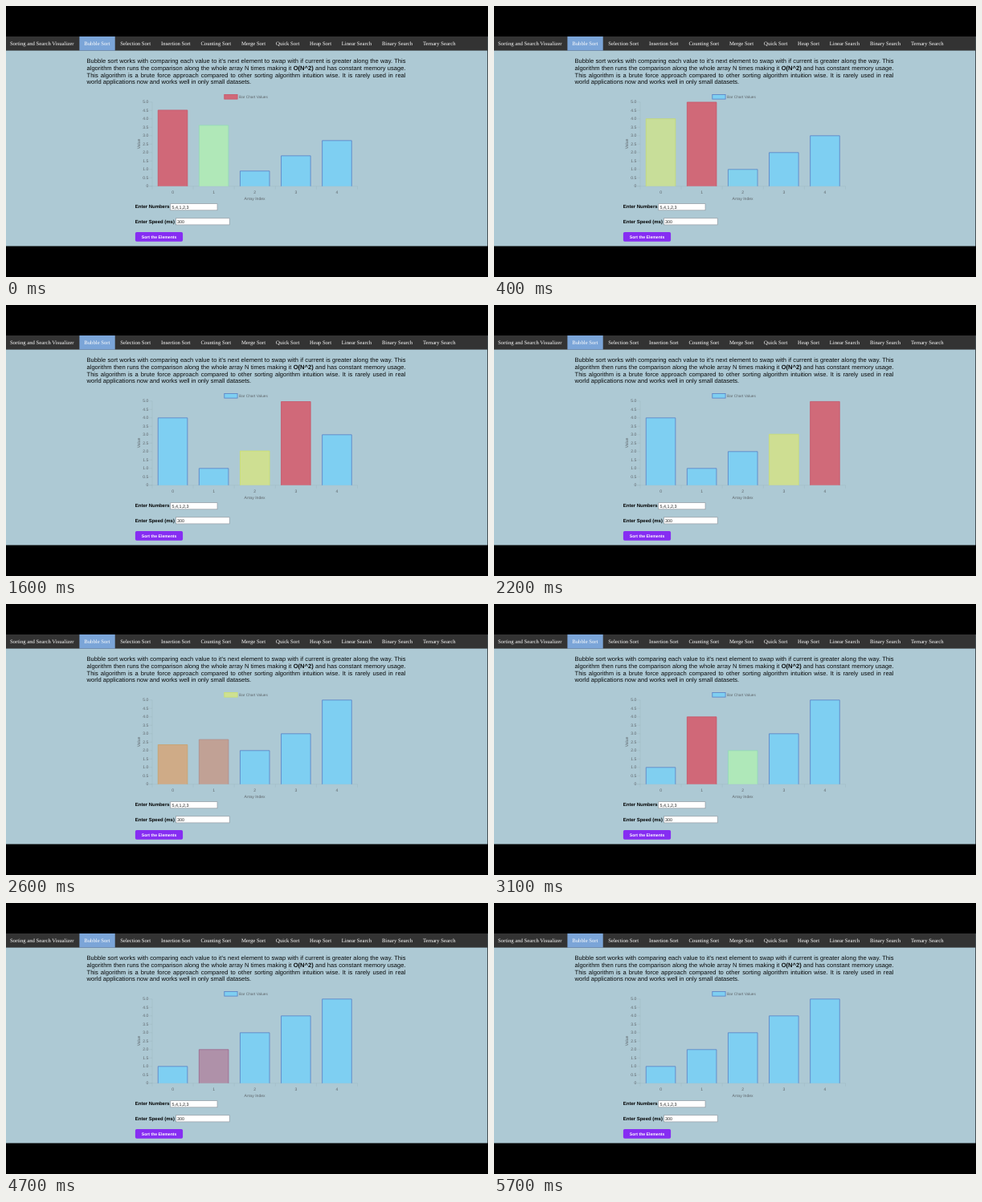
An HTML page that plays this animation: 600 px wide and 338 px high, repeating every 5.9 s.

```html
<!DOCTYPE html>
<html lang="en">
<head>
<meta charset="utf-8">
<title>Bubble Sort</title>
<style>
  html, body { margin: 0; width: 100%; height: 100%; overflow: hidden; background: #000; }
  #stage { position: absolute; left: 0; top: 0; width: 600px; height: 338px; overflow: hidden; }
  svg { position: absolute; left: 0; top: 0; }
  text { font-family: "Liberation Sans", Arial, sans-serif; text-rendering: geometricPrecision; }
  #nav text { font: 6.7px "Liberation Serif", "Times New Roman", serif; fill: #fff; }
  #chart text { font-size: 5.1px; fill: #5f666b; }
  #bars path { stroke-width: .8; }
  .form { font-size: 5.98px; font-weight: bold; }
  .field { font-size: 5.4px; fill: #222; }
  .box { fill: #fff; stroke: #8b9298; stroke-width: .6; }
  .mid { text-anchor: middle; }
  .end { text-anchor: end; }
  p {
    position: absolute; left: 100.5px; top: 0; width: 397px; margin: 0;
    transform: translateY(64.7px); text-rendering: geometricPrecision;
    font: 7.59px/8.75px "Liberation Sans", Arial, sans-serif; color: #080a0b;
  }
  p span { display: block; white-space: nowrap; text-align: justify; text-align-last: justify; }
  p span:last-child { text-align-last: left; }
</style>
</head>
<body>
<div id="stage">
  <svg width="600" height="338" viewBox="0 0 600 338">
    <rect width="600" height="338" fill="#000"/>
    <rect y="38" width="599.4" height="261.5" fill="#adc9d4"/>
    <rect y="38" width="599.4" height="17.6" fill="#333"/>
    <rect x="91.4" y="38" width="44.3" height="17.6" fill="#7ba5d8"/>
    <g id="nav"></g>
    <g id="chart">
      <rect id="key" x="271.8" y="110.5" width="16.3" height="5.6" stroke-width=".8"/>
      <text x="290" y="115" style="font-size:4.75px">Bar Chart Values</text>
      <text class="mid" transform="translate(167 172) rotate(-90)">Value</text>
      <text class="mid" x="309.6" y="241.6">Array Index</text>
      <path id="axes" fill="none" stroke="#000" stroke-opacity=".07" stroke-width=".6"/>
      <g id="bars"></g>
    </g>
    <text class="form" x="160.8" y="252.2">Enter Numbers</text>
    <rect class="box" x="204.8" y="246.7" width="58.2" height="8.1"/>
    <text class="field" x="206.5" y="252.8">5,4,1,2,3</text>
    <text class="form" x="160.8" y="270.5">Enter Speed (ms)</text>
    <rect class="box" x="211.6" y="264.8" width="66.6" height="8.1"/>
    <text class="field" x="213" y="270.9">300</text>
    <rect x="160.9" y="282" width="59.2" height="11.7" rx="1.8" fill="#862df2"/>
    <text class="mid" x="190.6" y="289.8" fill="#fff" style="font-size:5.15px;font-weight:bold">Sort the Elements</text>
  </svg>
  <p>
    <span>Bubble sort works with comparing each value to it's next element to swap with if current is greater along the way. This</span>
    <span>algorithm then runs the comparison along the whole array N times making it <b>O(N^2)</b> and has constant memory usage.</span>
    <span>This algorithm is a brute force approach compared to other sorting algorithm intuition wise. It is rarely used in real</span>
    <span>world applications now and works well in only small datasets.</span>
  </p>
</div>
<script>
const LOOP = 5900, FRAME = 100, TWEEN = 440, STEP = 304;
const BASE = 224.8, UNIT = 21, LEFT = 182, PITCH = 51.1, WIDTH = 36.6;

// fill rgb followed by border rgb
const BLUE = [126, 207, 242, 88, 126, 196];
const RED = [208, 104, 120, 200, 84, 104];
const GREEN = [176, 232, 184, 146, 216, 186];
const YELLOW = [206, 224, 146, 204, 226, 110];

const $ = id => document.getElementById(id);
function add(parent, tag, attrs, text) {
  const el = document.createElementNS("http://www.w3.org/2000/svg", tag);
  for (const k in attrs) el.setAttribute(k, attrs[k]);
  if (text) el.textContent = text;
  return parent.appendChild(el);
}

const links = {
  "Sorting and Search Visualizer": 4.9, "Bubble Sort": 97.3, "Selection Sort": 142.3,
  "Insertion Sort": 193.1, "Counting Sort": 242.4, "Merge Sort": 292.9, "Quick Sort": 336.1,
  "Heap Sort": 378.1, "Linear Search": 417.7, "Binary Search": 468.1, "Ternary Search": 519
};
for (const name in links) add($("nav"), "text", { x: links[name], y: 49 }, name);

for (let i = 0; i <= 10; i++) {
  const label = i ? (i / 2).toFixed(1) : "0";
  add($("chart"), "text", { class: "end", x: 177.4, y: BASE + 1.6 - i * UNIT / 2 }, label);
}
let axes = `M${LEFT} 119.8V${BASE}M178 ${BASE}H${LEFT + 5 * PITCH}`;
for (let i = 0; i < 11; i++) axes += `M178 ${BASE - i * UNIT / 2}H${LEFT}`;
for (let i = 0; i < 6; i++) axes += `M${LEFT + i * PITCH} ${BASE}v4`;
$("axes").setAttribute("d", axes);

const bars = [0, 1, 2, 3, 4].map(i => {
  add($("chart"), "text", { class: "mid", x: LEFT + (i + .5) * PITCH, y: 233.8 }, String(i));
  return add($("bars"), "path", {});
});

// Run the sort once and note each chart update
function record(list) {
  const log = [];
  const note = (j, a, b) => log.push({
    time: log.length ? 696 + STEP * (log.length - 3) : -195,
    values: [...list],
    colors: list.map((_, i) => i === j ? a : i === j + 1 ? b : BLUE)
  });
  for (let last = list.length - 1, swapped = true; swapped; last--) {
    swapped = false;
    for (let j = 0; j < last; j++) {
      note(j, RED, GREEN);
      if (list[j] > list[j + 1]) {
        [list[j], list[j + 1]] = [list[j + 1], list[j]];
        note(j, YELLOW, RED);
        swapped = true;
      }
    }
  }
  note(-9);
  return log;
}
const updates = record([5, 4, 1, 2, 3]);

const easeOut = x => 1 - (1 - Math.min(x, 1)) ** 4;
const at = (p, time) => p.from + (p.to - p.from) * easeOut((time - p.start) / TWEEN);

// Every property eases from wherever it is when its goal changes
function track(i) {
  const first = updates[0];
  const props = [0, ...first.colors[i]].map(v => ({ from: v, to: v, start: first.time }));
  let color = first.colors[i];
  return updates.map(u => {
    const next = u.colors[i], cut = color === GREEN && next === BLUE;
    [u.values[i], ...next].forEach((to, k) => {
      const p = props[k];
      if (to !== p.to) props[k] = { from: cut && k ? to : at(p, u.time), to, start: u.time };
    });
    color = next;
    return [...props];
  });
}
const tracks = bars.map((_, i) => track(i));
const rgb = c => `rgb(${c.map(Math.round)})`;

function paint(el, c) {
  el.setAttribute("fill", rgb(c.slice(0, 3)));
  el.setAttribute("stroke", rgb(c.slice(3)));
}

function draw(now) {
  const time = Math.floor(now % LOOP / FRAME) * FRAME;
  const n = updates.filter(u => u.time <= time).length - 1;
  bars.forEach((bar, i) => {
    const [value, ...color] = tracks[i][n].map(p => at(p, time));
    const x = LEFT + i * PITCH + (PITCH - WIDTH) / 2;
    bar.setAttribute("d", `M${x} ${BASE}V${BASE - value * UNIT}h${WIDTH}V${BASE}`);
    paint(bar, color);
  });
  paint($("key"), updates[n].colors[0]);
}

function tick() {
  draw(performance.now());
  requestAnimationFrame(tick);
}
tick();
</script>
</body>
</html>
```
